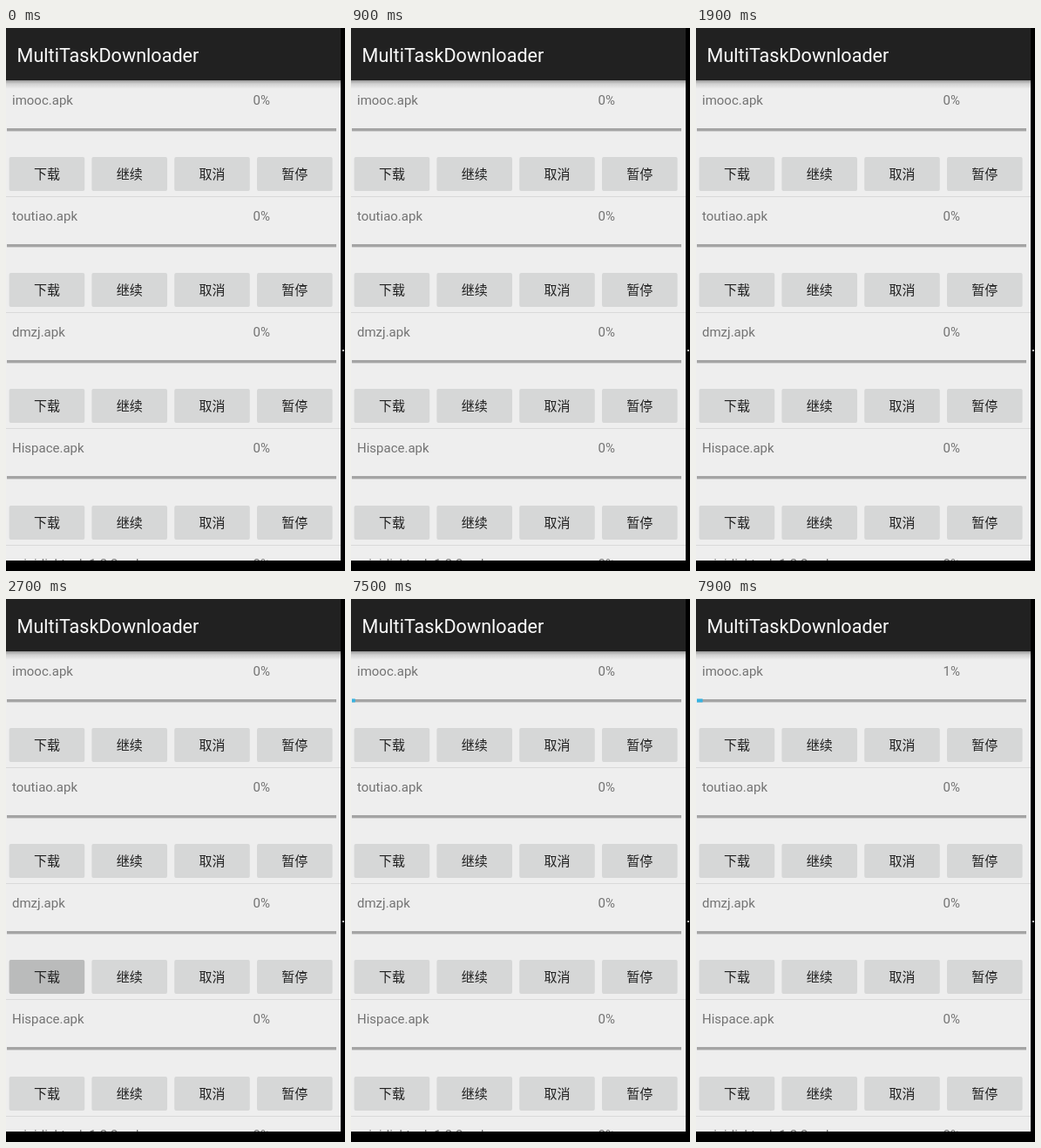
An HTML page with a canvas for the animation above (8 s loop, 389 by 623 pixels).

```html
<!DOCTYPE html>
<html lang="zh-CN">
<head>
<meta charset="utf-8">
<title>MultiTaskDownloader</title>
<style>
html, body { margin: 0; width: 100%; height: 100%; overflow: hidden; background: #000; }
canvas { display: block; width: 389px; height: 623px; }
</style>
</head>
<body>
<canvas id="stage" width="389" height="623"></canvas>
<script>
const ctx = document.getElementById('stage').getContext('2d');
const LOOP = 8000;
const SCREEN = { w: 384, h: 611 };
const PITCH = 133.2;
const FILES = ['imooc.apk', 'toutiao.apk', 'dmzj.apk', 'Hispace.apk', 'minidisktask 1.2.2.apk'];
const ACTIONS = ['下载', '继续', '取消', '暂停'];
const PRESSES = [800, 1800, 2700];
const PRESS_TIME = 100;
const LATIN = 'Roboto, sans-serif';
const HAN = '"Noto Sans CJK SC", "Noto Sans CJK", sans-serif';

function rect(x, y, w, h, color) {
  ctx.fillStyle = color;
  ctx.fillRect(x, y, w, h);
}

function label(text, x, y, size, color, family = LATIN, align = 'left') {
  ctx.font = `${size}px ${family}`;
  ctx.textAlign = align;
  ctx.fillStyle = color;
  ctx.fillText(text, x, y);
}

function button(text, x, y, pressed) {
  ctx.fillStyle = pressed ? '#babbbb' : '#d6d7d7';
  ctx.beginPath();
  ctx.roundRect(x, y, 86.6, 39, 2);
  ctx.fill();
  label(text, x + 43.3, y + 25.3, 15, '#202020', HAN, 'center');
}

function row(i, pressed, bar, percent) {
  const top = i * PITCH;
  const line = Math.round(top + 114.6);
  label(FILES[i], 7, top + 87.5, 15, '#737373');
  label(percent + '%', 283.6, top + 87.5, 15, '#737373');
  rect(1, line, 378, 3.4, '#a4a4a4');
  if (bar) rect(1, line - 0.5, bar, 4, '#36b3e2');
  ACTIONS.forEach((text, k) => {
    button(text, 3.6 + k * 94.8, Math.round(top + 148), pressed && k === 0);
  });
  rect(0, Math.round(top + 193), SCREEN.w, 1, '#d9d9d9');
}

function header() {
  const shade = ctx.createLinearGradient(0, 60, 0, 70);
  shade.addColorStop(0, 'rgba(0,0,0,.36)');
  shade.addColorStop(0.4, 'rgba(0,0,0,.12)');
  shade.addColorStop(1, 'rgba(0,0,0,0)');
  rect(0, 60, SCREEN.w, 10, shade);
  rect(0, 0, SCREEN.w, 60, '#212121');
  label('MultiTaskDownloader', 12.6, 38.6, 21.6, '#fafafa');
}

function draw(t) {
  // Download progress advances once every 100 ms.
  const step = Math.floor((t - 7500) / 100);
  const bar = step < 0 ? 0 : 3.8 + step * 0.7;
  const percent = step > 0 ? 1 : 0;

  rect(0, 0, 389, 623, '#000');
  ctx.save();
  ctx.beginPath();
  ctx.rect(0, 0, SCREEN.w, SCREEN.h);
  ctx.clip();
  rect(0, 0, SCREEN.w, SCREEN.h, '#eee');
  FILES.forEach((_, i) => {
    const pressed = t >= PRESSES[i] && t < PRESSES[i] + PRESS_TIME;
    row(i, pressed, i ? 0 : bar, i ? 0 : percent);
  });
  header();
  ctx.restore();
  rect(386, 369, 2, 2, '#bbb');
}

function tick() {
  draw(performance.now() % LOOP);
  requestAnimationFrame(tick);
}
tick();
</script>
</body>
</html>
```
